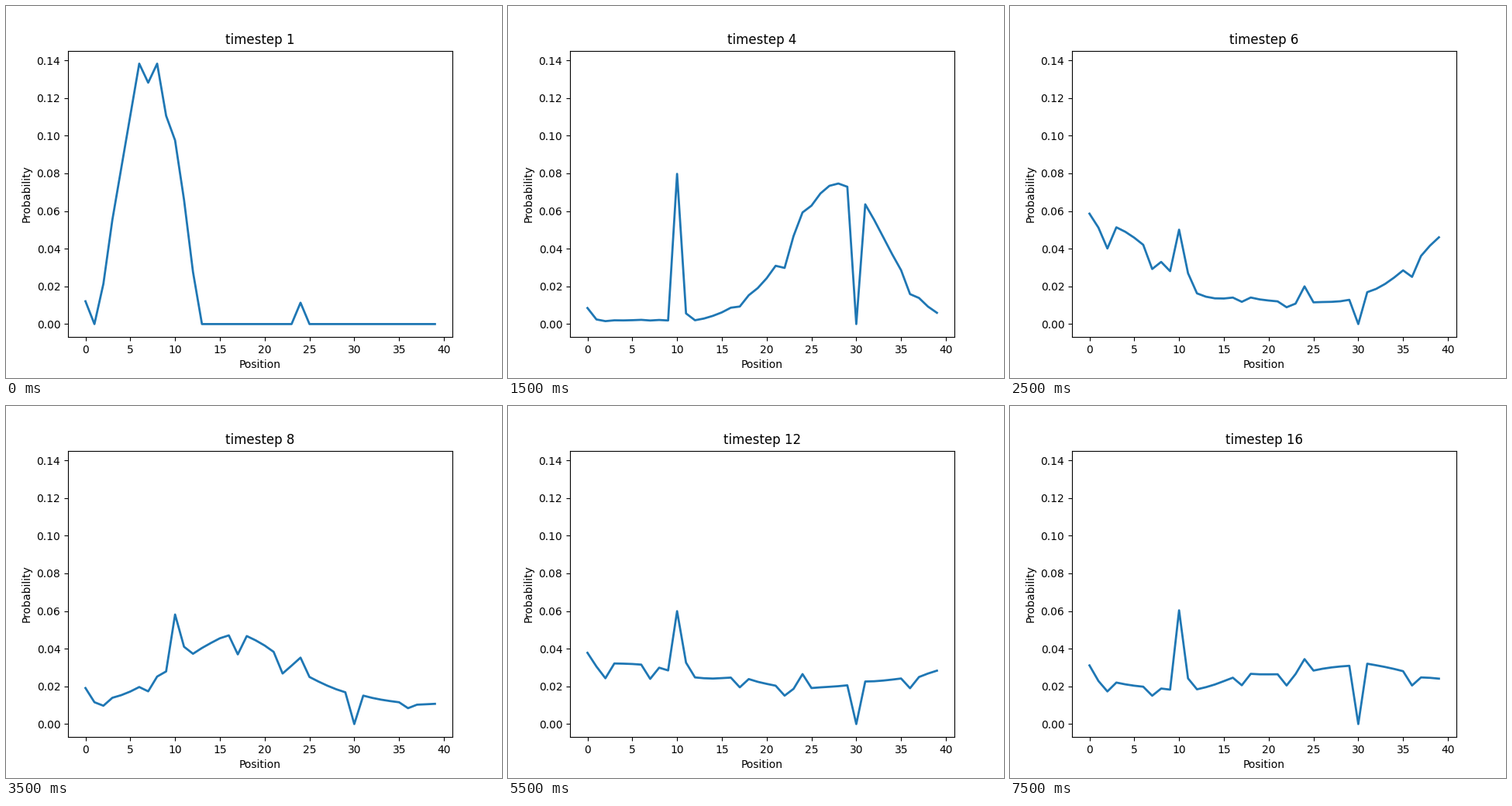
These frames come from a looping animation (640 px wide and 480 px high, 8 s). A matplotlib script:

```python
import numpy as np
import matplotlib.pyplot as plt
from matplotlib.animation import FuncAnimation

SQUARES = 40
STEPS = 16
JAIL, GO_TO_JAIL = 10, 30
CARD_SQUARES = (2, 7, 17, 22, 36)
CARD_TARGETS = (0, 24, 11, JAIL)  # drawn one after another
CARD_CHANCE = 1 / 16
TRIPLE_DOUBLE = 1 / 6**3


def roll(prob):
    """Move every square's probability by the sum of two dice."""
    moved = np.zeros(SQUARES)
    for a in range(1, 7):
        for b in range(1, 7):
            moved += np.roll(prob, a + b) / 36
    return moved


def transfer(prob, source, target, share):
    amount = prob[source] * share
    prob[source] -= amount
    prob[target] += amount


def advance(prob):
    prob = roll(prob) * (1 - TRIPLE_DOUBLE)
    prob[JAIL] += TRIPLE_DOUBLE
    for square in CARD_SQUARES:
        for target in CARD_TARGETS:
            transfer(prob, square, target, CARD_CHANCE)
    transfer(prob, GO_TO_JAIL, JAIL, 1)
    return prob


state = np.eye(SQUARES)[0]
history = []
for _ in range(STEPS):
    state = advance(state)
    history.append(state)

fig, ax = plt.subplots(figsize=(6.4, 4.8), dpi=100)
line, = ax.plot(np.arange(SQUARES), history[0], lw=2)
ax.set_xlabel("Position")
ax.set_ylabel("Probability")
title = ax.set_title("timestep 1")
ax.set_xlim(ax.get_xlim())
ax.set_ylim(ax.get_ylim())


def update(i):
    line.set_ydata(history[i])
    title.set_text(f"timestep {i + 1}")
    return line, title


anim = FuncAnimation(fig, update, frames=STEPS, interval=500, repeat=True, repeat_delay=0)
plt.show()
```
